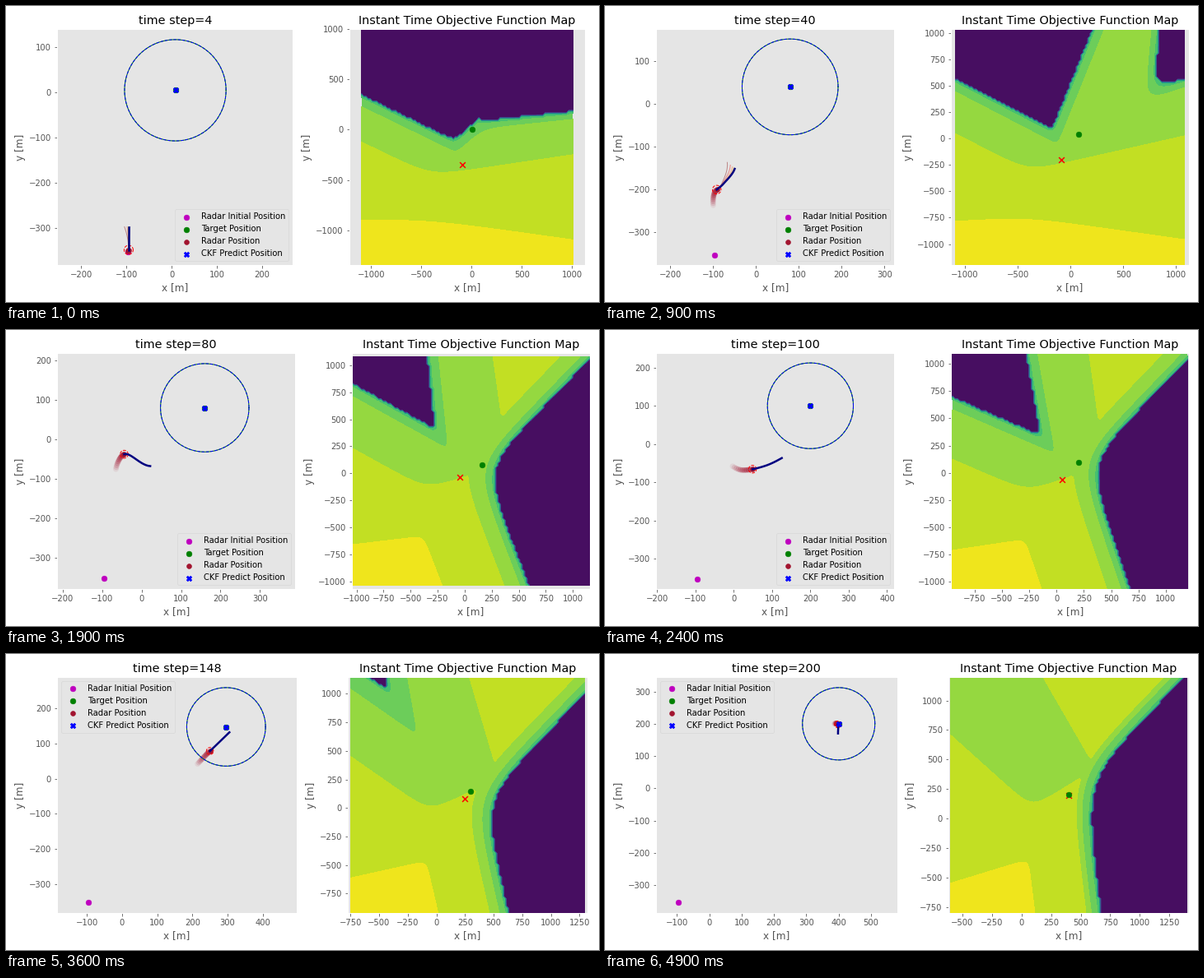
Animation of 720 by 360 pixels, one loop 5 s. Source, as a matplotlib script:

```python
import numpy as np
import matplotlib.pyplot as plt
from matplotlib.animation import FuncAnimation

plt.style.use("ggplot")
plt.rcParams["axes.grid"] = False

FRAMES, INTERVAL, STRIDE = 50, 100, 4
RANGE, HORIZON, MEMORY = 112, 15, 10
RADAR, DOT = "#A2142F", 46
SHADES = plt.cm.viridis(np.linspace(0.036, 0.975, 15))
BASE = 11

# Radar waypoints: time step, x, y
WAYPOINTS = np.array([
    (0, -96, -353), (4, -95, -349), (18, -94, -294), (38, -95, -205),
    (46, -76, -187), (56, -48, -147), (68, -66, -85), (80, -44, -38),
    (95, 22, -68), (106, 82, -57), (116, 130, -34), (148, 250, 79),
    (176, 349, 172), (190, 387, 200), (200, 397, 198), (215, 398, 170)], float)
TIMES, POINTS = WAYPOINTS[:, 0], WAYPOINTS[:, 1:]
SLOPES = np.gradient(POINTS, TIMES, axis=0)

# Tips of the two dark wedges of the objective map
TIP_STEPS = (4, 28, 56, 80, 116, 148, 200)
LEFT_TIP = ((-170, -100), (-180, 50), (-176, 153), (-281, 418),
            (-49, 300), (-420, 1036), (-420, 1900))
RIGHT_TIP = ((70, 90), (450, 470), (1250, 470), (183, 45),
             (371, 127), (406, 72), (538, 323))


def radar_path(t):
    """Cubic Hermite curve through the waypoints."""
    t = np.clip(np.atleast_1d(t).astype(float), 0, TIMES[-1])
    i = np.clip(np.searchsorted(TIMES, t, side="right") - 1, 0, len(TIMES) - 2)
    h = (TIMES[i + 1] - TIMES[i])[:, None]
    s = (t - TIMES[i])[:, None] / h
    return ((1 + 2 * s) * (1 - s) ** 2 * POINTS[i] + s * (1 - s) ** 2 * h * SLOPES[i]
            + s * s * (3 - 2 * s) * POINTS[i + 1] - s * s * (1 - s) * h * SLOPES[i + 1])


def tip_at(step, tips):
    return [np.interp(step, TIP_STEPS, axis) for axis in zip(*tips)]


def left_of(x, y, point, bearing):
    """Signed distance to a line, positive on its left side."""
    a = np.radians(bearing)
    return np.cos(a) * (y - point[1]) - np.sin(a) * (x - point[0])


def soft_max(a, b, radius):
    return radius * np.logaddexp(a / radius, b / radius)


def wedge(x, y, tip, start, stop, radius):
    """Depth inside the rounded wedge from one bearing counterclockwise to the other."""
    return -soft_max(-left_of(x, y, tip, start), left_of(x, y, tip, stop), radius)


def objective_regions(x, y, step, radar):
    """Depth fields of the dark, middle, high and top regions."""
    west = np.interp(step, (4, 80, 116, 148, 200), (154, 151, 161, 145, 138))
    south = np.interp(step, (4, 28, 56, 80, 200), (6, 24, 14, -69, -83))
    north = np.interp(step, (28, 80), (96, 46))

    left = wedge(x, y, tip_at(step, LEFT_TIP), min(40 + 0.7 * step, 100), west, 25)
    right = wedge(x, y, tip_at(step, RIGHT_TIP), south, north, min(140, 20 + 1.5 * step))
    dark = np.maximum(left, right)

    margin = np.interp(step, (116, 148), (110, 185))
    middle = -soft_max(left + margin, right + 85, 40)

    valley = wedge(x, y, radar + (-310, -110), 8 + 0.12 * step, west, 60)
    cap = (340 + 1.92 * (step - 80) + 40 * max(0, 80 - step), 525)
    valley = np.minimum(valley, left_of(x, y, cap, np.interp(step, (116, 200), (98, 120))))
    high = -np.maximum(valley, right + 280 - 0.75 * step)

    top = wedge(x, y, radar + (-340, -545), 180 + 0.085 * step, min(south, -8), 30)
    return dark, middle, high, top


fig, (scene, chart) = plt.subplots(1, 2, figsize=(10, 5), dpi=72)
ANGLES = np.linspace(0, 2 * np.pi, 120)
U, V = np.meshgrid(np.linspace(0, 1, 100), np.linspace(0, 1, 100))


def ring(center, radius, style, color):
    scene.plot(center[0] + radius * np.cos(ANGLES),
               center[1] + radius * np.sin(ANGLES), style, color=color, lw=1)


def draw_plan(step, radar):
    s = np.arange(HORIZON + 1.0)
    if step < 36:
        plan = radar + s[:, None] * np.array([0, min(5, 3 + 0.1 * step)])
    else:
        plan = radar_path(step + s)
    dx, dy = plan[-1] - plan[0]
    normal = np.array([-dy, dx]) / np.hypot(dx, dy)
    if step < 64:
        lowest = np.interp(step, (28, 56), (-0.7, 0.95))
        for k in np.linspace(lowest, 1, 7):
            reach = 23 * min(1, step / 10) * k ** 3
            line = plan + reach * (s[:, None] / HORIZON) ** 2 * normal
            scene.plot(*line.T, color=plt.cm.jet((k + 0.7) / 1.7), lw=1, alpha=0.4)
    scene.plot(*plan.T, color="navy", lw=2.5)


def draw_scene(step, radar, target):
    scene.clear()
    scene.scatter(*POINTS[0], color="m", s=DOT, label="Radar Initial Position")
    scene.scatter(*target, color="g", s=DOT, label="Target Position")
    ring(target, RANGE, "-", "g")
    trail = radar_path(np.arange(max(0, step - MEMORY), step))
    fade = np.linspace(0.08, 0.5, MEMORY)[-len(trail):]
    scene.scatter(*trail.T, color=RADAR, alpha=fade, s=DOT, linewidths=0)
    scene.scatter(*radar, color=RADAR, label="Radar Position")
    ring(radar, 10, "--", "r")
    draw_plan(step, radar)
    scene.scatter(*target, color="b", marker="X", s=DOT, label="CKF Predict Position",
                  zorder=3)
    ring(target, RANGE, "--", "b")
    scene.set_title(f"time step={step}")
    scene.legend(loc="best")


def draw_chart(step, radar, target):
    chart.clear()
    low, high = np.minimum(radar, target) - 1000, np.maximum(radar, target) + 1000
    x = low[0] + U * (high[0] - low[0])
    y = low[1] + V * (high[1] - low[1])
    dark, *regions = objective_regions(x, y, step, radar)
    chart.contourf(x, y, np.zeros_like(x), [-1, 1], colors=[SHADES[BASE]])
    for region, shade in zip(regions, SHADES[BASE + 1:]):
        chart.contourf(x, y, region, [0, 1e5], colors=[shade])
    # The sharp drop lets the grid show as small stairs
    ramp = np.where(dark > -10, 0.5, BASE - 1 + np.minimum(-dark / 25, 1.5))
    chart.contourf(x, y, ramp, np.arange(BASE + 1), colors=SHADES[:BASE])
    chart.scatter(*radar, color="r", marker="x", s=DOT)
    chart.scatter(*target, color="g", s=DOT)
    chart.set_title("Instant Time Objective Function Map")


def reset():
    fig.subplots_adjust(left=0.125, right=0.9, bottom=0.11, top=0.863, wspace=0.2)
    return []


def update(frame):
    step = STRIDE * (frame + 1)
    radar, target = radar_path(step)[0], np.array([2.0 * step, 1.0 * step])
    draw_scene(step, radar, target)
    draw_chart(step, radar, target)
    for ax in (scene, chart):
        ax.set_xlabel("x [m]")
        ax.set_ylabel("y [m]")
        ax.axis("equal")
    fig.tight_layout()
    return []


anim = FuncAnimation(fig, update, frames=FRAMES, init_func=reset,
                     interval=INTERVAL, repeat=True, repeat_delay=0)
plt.show()
```
